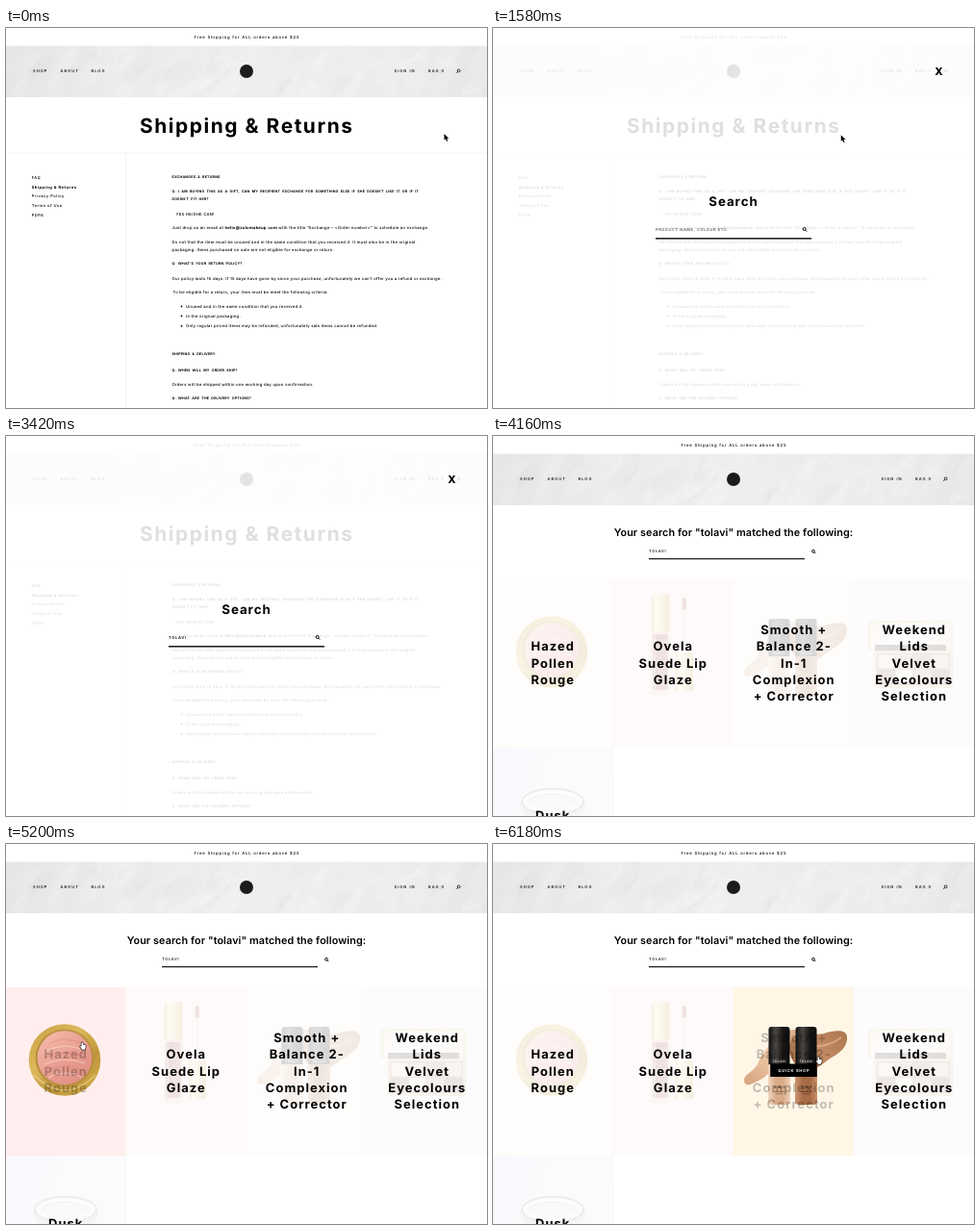
These frames come from a looping animation (500x395 px, 6360 ms). An HTML page with a canvas:

```html
<!DOCTYPE html>
<html lang="en">
<head>
<meta charset="utf-8">
<title>Shop search</title>
<style>
html, body { margin: 0; width: 100%; height: 100%; overflow: hidden; background: #fff; }
canvas { display: block; width: 500px; height: 395px; }
</style>
</head>
<body>
<canvas id="stage"></canvas>
<script>
const W = 500, H = 395, LOOP = 6360, K = 10;
const canvas = document.getElementById('stage');
const dpr = window.devicePixelRatio || 1;
canvas.width = W * dpr;
canvas.height = H * dpr;
const c = canvas.getContext('2d');

const clamp = v => Math.max(0, Math.min(1, v));
const smooth = v => (v = clamp(v), v * v * (3 - 2 * v));

// ---- drawing helpers ----
// y is the middle of the capitals; laid out large and scaled down for exact spacing
function text(s, x, y, size, weight = 500, ls = 0, color = '#000', align = 'left', ws = 0) {
  c.save();
  c.translate(align === 'center' ? x + ls / 2 : x, y + size * 0.364);
  c.scale(1 / K, 1 / K);
  c.font = `${weight} ${size * K}px Inter, "Liberation Sans", sans-serif`;
  c.letterSpacing = ls * K + 'px';
  c.wordSpacing = ws * K + 'px';
  c.textRendering = 'geometricPrecision';
  c.textAlign = align;
  c.fillStyle = color;
  c.fillText(s, 0, 0);
  const w = c.measureText(s).width / K;
  c.restore();
  return w;
}
function rect(x, y, w, h, fill) {
  c.fillStyle = fill;
  c.fillRect(x, y, w, h);
}
function round(x, y, w, h, r, fill) {
  c.fillStyle = fill;
  c.beginPath();
  c.roundRect(x, y, w, h, r);
  c.fill();
}
function oval(x, y, rx, ry, fill, rot = 0) {
  c.fillStyle = fill;
  c.beginPath();
  c.ellipse(x, y, rx, ry, rot, 0, 7);
  c.fill();
}
function shape(d, fill, stroke, width = 1) {
  const p = new Path2D(d);
  if (stroke) {
    c.strokeStyle = stroke;
    c.lineWidth = width;
    c.stroke(p);
  }
  if (fill) {
    c.fillStyle = fill;
    c.fill(p);
  }
}
function blend(x0, y0, x1, y1, ...cols) {
  const g = c.createLinearGradient(x0, y0, x1, y1);
  cols.forEach((col, i) => g.addColorStop(i / (cols.length - 1), col));
  return g;
}
// magnifier; dir is the side of the handle, 1 right or -1 left
function lens(x, y, r, width, dir = 1) {
  const k = r * 0.7;
  c.strokeStyle = '#000';
  c.lineWidth = width;
  c.beginPath();
  c.arc(x, y, r, 0, 7);
  c.moveTo(x + k * dir, y + k);
  c.lineTo(x + (k + r) * dir, y + k + r);
  c.stroke();
}

// ---- header ----
function marble() {
  c.save();
  c.beginPath();
  c.rect(0, 18.5, W, 53.5);
  c.clip();
  rect(0, 18, W, 54, blend(0, 0, W, 0, '#e6e6e6', '#ececec', '#eeeeee', '#ededed', '#e7e7e7'));
  let seed = 11;
  const rnd = () => (seed = seed * 16807 % 2147483647) / 2147483647;
  for (let i = 0; i < 110; i++) {
    const tone = rnd() < 0.6 ? '255,255,255' : '212,212,212';
    oval(rnd() * W, 18 + rnd() * 54, 6 + rnd() * 20, 1.5 + rnd() * 7,
      `rgba(${tone},${0.05 + rnd() * 0.09})`, -0.5 - rnd() * 0.7);
  }
  for (let i = 0; i < 14; i++) {
    const x = 342 + i * 7 + rnd() * 5, y = 26 + rnd() * 30;
    shape(`M${x} ${y + 14}L${x + 13} ${y}`, null, 'rgba(255,255,255,.35)', 0.8);
  }
  c.restore();
}
function header() {
  rect(0, 0, W, H, '#fff');
  text('Free Shipping for ALL orders above $25', 250, 9.2, 4.3, 500, 0.74, '#000', 'center');
  marble();
  const nav = [['SHOP', 28], ['ABOUT', 56.5], ['BLOG', 88.5], ['SIGN IN', 403.5], ['BAG 0', 439]];
  for (const [s, x] of nav) text(s, x, 44.7, 4.1, 500, 0.98);
  oval(250, 45, 7, 7, '#1c1c1c');
  lens(470.6, 44.4, 1.4, 0.8, -1);
}

// ---- policy page ----
const MAIL = 'hello@zulomakeup.com';
const BOLD = [
  [155, 'EXCHANGES & RETURNS'],
  [169.8, 'Q: I AM BUYING THIS AS A GIFT, CAN MY RECIPIENT EXCHANGE FOR SOMETHING ELSE IF SHE DOESN’T LIKE IT OR IF IT'],
  [178, 'DOESN’T FIT HER?'],
  [245, 'Q: WHAT’S YOUR RETURN POLICY?'],
  [338.5, 'SHIPPING & DELIVERY'],
  [355.8, 'Q: WHEN WILL MY ORDER SHIP?'],
  [385, 'Q: WHAT ARE THE DELIVERY OPTIONS?']
];
const PLAIN = [
  [176.5, 193, 'YES HE/SHE CAN!'],
  [172.5, 222, 'Do not that the item must be unused and in the same condition that you received it. It must also be in the original'],
  [172.5, 230.2, 'packaging. Items purchased on sale are not eligible for exchange or return.'],
  [172.5, 260, 'Our policy lasts 15 days. If 15 days have gone by since your purchase, unfortunately we can’t offer you a refund or exchange.'],
  [173.5, 274.3, 'To be eligible for a return, your item must be meet the following criteria:'],
  [187, 289.2, 'Unused and in the same condition that you received it.'],
  [187, 299.2, 'In the original packaging.'],
  [187, 309.5, 'Only regular priced items may be refunded, unfortunately sale items cannot be refunded.'],
  [172.5, 370.3, 'Orders will be shipped within one working day upon confirmation.']
];
const body = (s, x, y, weight = 500) => text(s, x, y, 4.2, weight, 0.245);

function policyPage() {
  header();
  text('Shipping & Returns', 249.5, 101, 21, 700, 1.5, '#000', 'center');
  rect(0, 129.5, W, 1, '#f1f1f1');
  rect(124, 130, 1, H, '#f4f4f4');
  ['FAQ', 'Shipping & Returns', 'Privacy Policy', 'Terms of Use', 'PDPA'].forEach((s, i) =>
    text(s, 26.7, 155.3 + i * 9.8, 4.1, i === 1 ? 700 : 500, 0.48));
  for (const [y, s] of BOLD) text(s, 172.5, y, 3.65, 700, 0.19, '#000', 'left', 1.05);
  for (const [x, y, s] of PLAIN) body(s, x, y);
  for (const y of [289.4, 299.4, 309.7]) oval(182.5, y, 0.9, 0.9, '#000');
  let x = 172.5;
  x += body('Just drop us an email at ', x, 207.4);
  x += body(MAIL, x, 207.4, 700);
  body(' with the title “Exchange – <Order number>” to schedule an exchange.', x, 207.4);
}

// ---- search overlay ----
const WORD = 'TOLAVI';
const KEYS = [2480, 2600, 2740, 2900, 3020, 3160];
function overlay(t) {
  const k = smooth((t - 1120) / 420);
  if (!k) return;
  c.globalAlpha = k;
  rect(0, 0, W, H, 'rgba(255,255,255,.875)');
  text('X', 463.5, 44.8, 11, 800, 0, '#000', 'center');
  text('Search', 249.5, 180.3, 13.4, 700, 0.9, '#000', 'center');
  rect(169, 218, 162, 1.6, '#222');
  lens(323.6, 209, 1.5, 1);
  const n = KEYS.filter(k => t >= k).length;
  if (n) {
    const w = text(WORD.slice(0, n), 169, 210, 4, 600, 0.68);
    const blink = t < 3400 || (t >= 3620 && t < 3800);
    if (blink) rect(169 + w, 207.3, 0.6, 5.4, '#333');
  } else {
    text('PRODUCT NAME, COLOUR ETC.', 169, 210, 4, 500, 0.58, '#444');
  }
  c.globalAlpha = 1;
}

// ---- products ----
const gold = (x, w) => blend(x, 0, x + w, 0, '#cfa653', '#fbecc4', '#efd393', '#dfbb70', '#c79c4a');

function blush() {
  oval(61, 224.5, 37.3, 37.3, blend(30, 190, 92, 262, '#c9a144', '#dcb95c', '#bf973b', '#d4ad4c'));
  oval(61, 222.5, 30.5, 30, '#ba9040');
  oval(61, 222.2, 28.3, 28, blend(40, 195, 82, 248, '#f5bcac', '#ea9f92', '#df8e83'));
  for (let i = 0; i < 6; i++) {
    const y = 205 + i * 7, inset = Math.abs(i - 2.5) * 2;
    shape(`M${39 + inset} ${y + 3}Q60 ${y - 6} ${83 - inset} ${y + 2}`,
      null, i % 2 ? 'rgba(255,225,205,.45)' : 'rgba(200,105,100,.22)', 1.5);
  }
  shape('M29 240Q61 272 93 240', null, 'rgba(255,235,170,.5)', 1.3);
}
function gloss() {
  round(164.5, 164, 19, 40, 1.5, gold(164.5, 19));
  rect(166.5, 203, 15, 4, '#dcb4a6');
  round(164, 205, 20, 64, [2, 2, 4, 4], '#e6cbc4');
  round(166, 206, 16, 58, [2, 2, 3, 3], blend(166, 0, 182, 0, '#b0706a', '#95504a', '#a05851', '#b4736b'));
  rect(167.5, 208, 1.5, 54, 'rgba(255,225,215,.45)');
  c.save();
  c.translate(174.5, 250);
  c.rotate(-Math.PI / 2);
  text(WORD, 0, 0, 4.5, 600, 0.7, '#ecc9a8');
  c.restore();
  rect(196.5, 181, 4.5, 44, 'rgba(250,240,238,.85)');
  rect(198.2, 181, 1.2, 44, '#dcbcb2');
  round(196.5, 168, 4.5, 13, 2.2, '#a9605a');
  round(189.5, 225, 18.5, 40, 1.5, gold(189.5, 18.5));
}
function bottle(x, dark, light) {
  round(x, 190, 22, 40, [3, 3, 1, 1], blend(x, 0, x + 22, 0, '#111', '#4a4644', '#191716', '#0c0c0c'));
  round(x - 0.5, 229, 23, 42, [1, 1, 4, 4], blend(x, 0, x + 23, 0, light, dark, dark, light));
  text(WORD, x + 11, 226.3, 3.2, 600, 0.4, '#eee', 'center');
  text('2-IN-1', x + 11, 253, 3.4, 600, 0.2, '#3b2a22', 'center');
  rect(x + 5, 257, 12, 0.6, 'rgba(50,30,20,.6)');
  rect(x + 7, 259.5, 8, 0.6, 'rgba(50,30,20,.6)');
}
function foundation() {
  shape('M262 249C258 240 270 238 275 229C282 213 295 197 312 193C318 192 315 200 309 206C297 219 291 240 276 246C270 249 265 252 262 249Z',
    blend(262, 250, 315, 193, '#d5a47e', '#edc6a5', '#dcae88'));
  shape('M310 204C318 192 332 200 344 197C354 194 367 192 368 200C369 210 361 217 352 222C341 229 334 238 322 235C312 231 304 214 310 204Z',
    blend(315, 235, 368, 195, '#a46d48', '#c18b64', '#ad7650'));
  shape('M322 209Q345 214 362 201', null, 'rgba(235,190,155,.6)', 2);
  bottle(286.5, '#d9ac88', '#f0d5bd');
  bottle(314.5, '#a86b45', '#c9946e');
}
function palette() {
  round(389.5, 192, 89, 31, 2, '#e3c9a6');
  rect(393, 195, 82, 26, blend(393, 195, 475, 221, '#f1e2d6', '#fbf4ee', '#ead8c8'));
  rect(397, 217, 74, 6, '#4a3a33');
  round(396.5, 223, 82, 39, 2, '#dcbd96');
  rect(399, 226, 76, 33, '#a58a76');
  const pans = ['#f0dccb', '#d9b598', '#b58c74', '#e5c3ac', '#9c735f', '#f4e6d8', '#c99f83', '#8b6b5b'];
  pans.forEach((col, i) => rect(400.5 + (i % 4) * 18.7, 227.5 + (i >> 2) * 15.5, 17, 14, col));
}
function jar() {
  rect(0, 324, 125, 71, blend(0, 330, 125, 370, '#e6d6f4', '#f0e2f2', '#efedf0'));
  oval(62, 384, 34, 19, '#cdbfd2');
  oval(62, 380, 33, 14, '#8f8494');
  oval(62, 380, 31, 12.5, '#efe8f2');
  oval(62, 379, 24, 8.5, '#c6b7cb');
  oval(62, 380, 22.5, 7.5, '#eadff0');
  shape('M40 374Q62 366 85 375', null, '#fff', 2);
}

const CELLS = [
  { x: 0, y: 148.5, w: 124.5, bg: '#ffeeed', art: blush, name: ['Hazed', 'Pollen', 'Rouge'], top: 218.7, on: [[4966, 5432]] },
  { x: 124.5, y: 148.5, w: 125.5, bg: '#ffe4e4', art: gloss, name: ['Ovela', 'Suede Lip', 'Glaze'], top: 218.7, on: [[4360, 4966], [5432, 5866]] },
  { x: 250, y: 148.5, w: 125.5, bg: '#fff6e6', art: foundation, name: ['Smooth +', 'Balance 2-', 'In-1', 'Complexion', '+ Corrector'], top: 201.5, on: [[5866, 9999]] },
  { x: 375.5, y: 148.5, w: 124.5, bg: '#f4eef4', art: palette, name: ['Weekend', 'Lids', 'Velvet', 'Eyecolours', 'Selection'], top: 201.5, on: [] },
  { x: 0, y: 324, w: 124.5, bg: '#e9dcf2', art: jar, name: ['Dusk'], top: 394.3, on: [] }
];
// strength of a hover effect that starts `wait` ms after the pointer enters
const hover = (on, t, wait, fade) => Math.max(0, ...on.map(([a, b]) =>
  clamp((t - a - wait) / fade) * (1 - clamp((t - b) / 150))));

function cell(o, t) {
  const h = hover(o.on, t, 0, 150), mid = o.x + o.w / 2;
  c.save();
  c.beginPath();
  c.rect(o.x, o.y, o.w, 175.5);
  c.clip();
  rect(o.x, o.y, o.w, 175.5, o.bg);
  o.art();
  rect(o.x, o.y, o.w, 175.5, `rgba(255,255,255,${0.83 * (1 - h)})`);
  c.globalAlpha = 1 - 0.76 * h;
  o.name.forEach((s, i) => text(s, mid - 0.5, o.top + i * 17.15, 13, 700, 1, '#000', 'center'));
  c.globalAlpha = hover(o.on, t, 250, 50);
  if (c.globalAlpha) {
    rect(mid - 24.5, 228.5, 48.5, 13.5, '#000');
    text('QUICK SHOP', mid - 0.3, 235.3, 4.1, 700, 0.72, '#fff', 'center');
  }
  c.restore();
}
function resultsPage(t) {
  header();
  text('Your search for "tolavi" matched the following:', 250, 99.7, 10.85, 600, 0.07, '#000', 'center');
  text(WORD, 162, 119.5, 4, 500, 0.68);
  rect(162, 127, 162, 1.3, '#222');
  lens(333, 119.8, 1.4, 0.9);
  for (const o of CELLS) cell(o, t);
}

// ---- pointer ----
const PATH = [
  [20, 455.5, 110], [220, 457, 106], [400, 457, 106], [1020, 469, 44],
  [1420, 469, 44], [1760, 236, 190], [2320, 234, 211],
  [4360, 234, 212], [4560, 203, 212], [4700, 201, 212], [5150, 80, 210],
  [5240, 80, 210], [5560, 141, 209], [5730, 147, 209], [5990, 339, 225]
];
function place(t) {
  const i = PATH.findIndex(p => p[0] > t);
  if (i === 0) return PATH[0].slice(1);
  if (i < 0) return PATH[PATH.length - 1].slice(1);
  const [a, ax, ay] = PATH[i - 1], [b, bx, by] = PATH[i];
  const k = smooth((t - a) / (b - a));
  return [ax + (bx - ax) * k, ay + (by - ay) * k];
}
const ARROW = 'M0 0V6.6L1.5 5.2L2.6 7.8L3.8 7.3L2.7 4.8H4.8Z';
const HAND = 'M-1.6 -3.6Q-.7 -4.4 -.2 -3.2L.3 -1.2Q1.2 -1.7 1.5 -.9Q2.6 -1.2 2.8 0Q3 2.4 1.8 3.8H-1Q-2.2 2 -3 .6Q-2.8 -.4 -1.4 .4Z';
const BEAM = 'M-1.2 -4H1.2M0 -4V4M-1.2 4H1.2';
function pointer(t) {
  if (t >= 2420 && t < 4360) return;
  const [x, y] = place(t);
  c.save();
  c.translate(x, y);
  if (t >= 4360 || (t > 960 && t < 1440)) shape(HAND, '#fff', '#111', 1.2);
  else if (t > 1900) shape(BEAM, null, '#333', 0.7);
  else shape(ARROW, '#000', '#fff', 1);
  c.restore();
}

// ---- loop ----
const start = performance.now();
function frame() {
  const t = (performance.now() - start) % LOOP;
  c.setTransform(dpr, 0, 0, dpr, 0, 0);
  c.globalAlpha = 1;
  if (t < 3970) {
    policyPage();
    overlay(t);
  } else {
    resultsPage(t);
  }
  pointer(t);
  requestAnimationFrame(frame);
}
frame();
</script>
</body>
</html>
```
